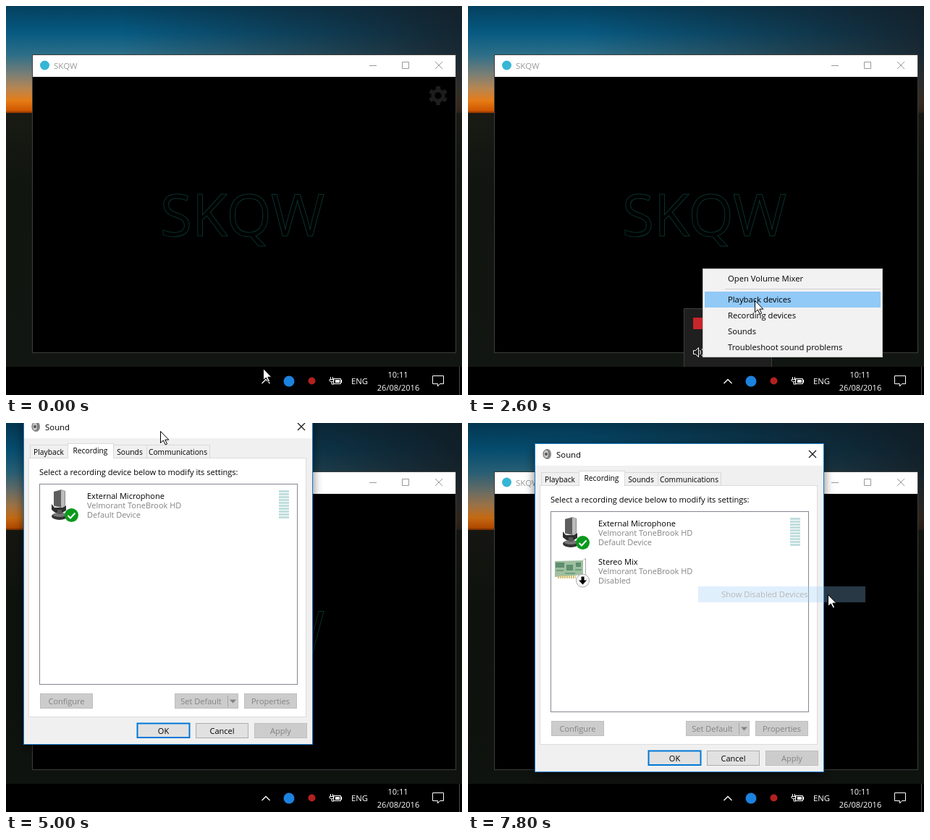
An HTML page for the animation above (8000 ms loop, 630x538 px).

```html
<!DOCTYPE html>
<html lang="en">
<head>
<meta charset="utf-8">
<title>Sound settings</title>
<style>
  html, body { margin: 0; width: 100%; height: 100%; overflow: hidden; background: #000; }
  svg { display: block; width: 100vw; height: 100vh; font-family: "Open Sans", sans-serif; font-size: 11px; }
  .mid { text-anchor: middle; }
  .line { fill: none; stroke: #fff; }
  .dim { fill: #838383; }
  .menu { font-size: 11.25px; }
  .tab { font-size: 10.25px; }
</style>
</head>
<body>
<svg viewBox="0 0 630 538">
  <defs>
    <linearGradient id="sky" x2="0" y2="1">
      <stop offset="0" stop-color="#04405f"/>
      <stop offset=".25" stop-color="#075a82"/>
      <stop offset=".46" stop-color="#2f6f88"/>
      <stop offset=".64" stop-color="#7d7f74"/>
      <stop offset=".77" stop-color="#b98650"/>
      <stop offset=".88" stop-color="#e67c16"/>
      <stop offset=".97" stop-color="#cf5600"/>
      <stop offset="1" stop-color="#6b2600"/>
    </linearGradient>
    <linearGradient id="dusk">
      <stop offset=".25" stop-color="#161c22" stop-opacity="0"/>
      <stop offset="1" stop-color="#161c22" stop-opacity=".85"/>
    </linearGradient>
    <linearGradient id="ground" x2="0" y2="1">
      <stop offset="0" stop-color="#191a14"/>
      <stop offset=".3" stop-color="#10150f"/>
      <stop offset="1" stop-color="#121612"/>
    </linearGradient>
    <filter id="shadow" x="-10%" y="-10%" width="120%" height="120%">
      <feDropShadow dx="0" dy="4" stdDeviation="7" flood-opacity=".55"/>
    </filter>
  </defs>

  <g id="desktop">
    <rect width="630" height="149" fill="url(#sky)"/>
    <rect width="630" height="149" fill="url(#dusk)"/>
    <rect y="148" width="630" height="351" fill="url(#ground)"/>
    <rect id="shade" width="630" height="499" opacity=".15"/>
  </g>

  <g id="player">
    <rect x="36.5" y="67.5" width="585" height="412" stroke="#3b3d3b"/>
    <rect x="37" y="68" width="584" height="30" fill="#fff"/>
    <circle cx="53.5" cy="82" r="6.5" fill="#35b6d4"/>
    <text x="66" y="87" font-size="11.5" fill="#999">SKQW</text>
    <path d="M502 82.5h10M547.5 77.5h9v9h-9zM593 77l10 10m0-10l-10 10" fill="none" stroke="#999"/>
    <text x="213" y="318" font-size="80" fill="none" stroke="#07332d">SKQW</text>
    <g id="gear" transform="translate(597 124)" fill="none" stroke="#1d1d1d">
      <circle r="7.2" stroke-width="5"/>
    </g>
  </g>

  <g id="taskbar">
    <rect y="499" width="630" height="39"/>
    <rect id="trayHover" x="347" y="499" width="24" height="39" fill="#1c1c1c"/>
    <path class="line" d="M353.5 522l5.500-5.500 5.500 5.500" stroke-width="1.300"/>
    <circle cx="391" cy="519" r="7.500" fill="#1c82e0"/>
    <circle cx="422.500" cy="518.500" r="5" fill="#b3211f"/>
    <path class="line" d="M452.500 515.500h10v7h-10zM463.500 517v4M448.500 513v3m3-3v3M447 516.500h6v2q-3 3-6 0zM450 520v3h3"/>
    <rect x="455" y="517" width="6" height="4" fill="#fff"/>
    <g fill="#fff">
      <text x="477" y="523" font-size="11.300">ENG</text>
      <text class="mid" x="541.500" y="514">10:11</text>
      <text class="mid" x="542" y="532">26/08/2016</text>
    </g>
    <path class="line" d="M589.500 511.500h15v11h-5l-3 3.500v-3.500h-7z"/>
    <path d="M626.500 499v39" stroke="#4a4a4a"/>
  </g>

  <g id="flyout">
    <path d="M298.500 499v-80.500h121v80.500" fill="#1f1f1f" stroke="#3d3d3d"/>
    <rect id="speakerHover" x="299" y="459" width="40" height="40" fill="#404040"/>
    <rect x="311" y="431" width="16" height="16" rx="1" fill="#c9252c"/>
    <circle cx="359" cy="439" r="8" fill="#1da1e6"/>
    <path d="M393 432h13v10h-13z" fill="#8b8b8b" stroke="#ccc"/>
    <path d="M392 444h5v3h-5zM401 444h5v3h-5z" fill="#b5b5b5"/>
    <path class="line" d="M311.500 476.500h3l4-4v13l-4-4h-3zM320.500 476q2 3 0 6M323 474q3.500 5 0 10M325.500 472.500q4 6.500 0 13"/>
    <circle cx="359" cy="479.500" r="6" fill="#fff"/>
    <path class="line" d="M394 486a12 12 0 0 1 12-12M397 486a9 9 0 0 1 9-9M400 486a6 6 0 0 1 6-6"/>
    <circle cx="404.500" cy="484.500" r="1.600" fill="#fff"/>
  </g>

  <g id="dialog">
    <rect x="92.500" y="28.500" width="399" height="454" fill="#f0f0f0" stroke="#1979ca" filter="url(#shadow)"/>
    <rect x="93" y="29" width="398" height="30" fill="#fff"/>
    <ellipse cx="110" cy="43" rx="5" ry="7" fill="#8b8b8b"/>
    <ellipse cx="108" cy="43" rx="4" ry="6" fill="#c6c6c6" stroke="#555"/>
    <circle cx="108" cy="43" r="2" fill="#555"/>
    <text x="122" y="48" font-size="11.400">Sound</text>
    <path d="M471 38l10 10m0-10l-10 10" stroke="#111" stroke-width="1.200"/>
    <rect x="99.500" y="86.500" width="383" height="358" fill="#fff" stroke="#dcdcdc"/>
    <g id="tabs"></g>
    <text x="114" y="110" font-size="11.100">Select a recording device below to modify its settings:</text>
    <rect x="114.500" y="122.500" width="356" height="277" fill="#fff" stroke="#828790"/>
    <g id="microphone">
      <ellipse cx="142" cy="167" rx="11" ry="5" fill="#333"/>
      <ellipse cx="142" cy="165" rx="9" ry="3" fill="#777"/>
      <path d="M131 150l4 5h11l5-3v7l-5 3h-10l-5-4z" fill="#2e2e2e"/>
      <path d="M139 158h6v6h-6z" fill="#555"/>
      <path d="M134 133l10-3 6 2v20l-6 3-10-2z" fill="#888"/>
      <path d="M134 133l10-2v23l-10-2z" fill="#5e5e5e"/>
      <path d="M144 131l5 1v20l-5 2z" fill="#bbb"/>
      <circle cx="158.500" cy="165.500" r="9.500" fill="#0b9a1d"/>
      <path class="line" d="M153.500 166l3.500 3.500 6.500-7" stroke-width="2"/>
    </g>
    <g id="meter" fill="#c1dede"></g>
    <g id="stereo">
      <path d="M120 191l39-1v20l-39 3z" fill="#9fbf9f"/>
      <path d="M121 193h12v7h-12zM136 196h9v8h-9zM149 193h7v6h-7z" fill="#5e8f70"/>
      <path d="M122 204h10M134 208h14M148 203h9" stroke="#6fa083" stroke-width="2"/>
      <path d="M124 213h25" stroke="#d5bf72" stroke-width="4" stroke-dasharray="2 1"/>
      <path d="M159.500 190l3-3v24" fill="none" stroke="#aaa"/>
      <circle cx="158.500" cy="218" r="9" fill="#f6f6f6" stroke="#aaa"/>
      <path d="M156.500 212.500h4v5h3.500l-5.500 6-5.500-6h3.500z"/>
    </g>
    <g id="buttons"></g>
    <path d="M374.500 415v16" stroke="#a5a5a5"/>
    <path d="M377 420.500h9l-4.500 5z" fill="#838383"/>
  </g>

  <g id="menus"></g>
  <path id="cursor" d="M.5.5v16l3.800-3.500 3 6 2.300-1.100-2.800-5.700h5z" fill="#fff" stroke="#000"/>
</svg>
<script>
const LOOP = 8000, STEP = 200;
const $ = id => document.getElementById(id);

function add(parent, tag, attrs, text = '') {
  const el = document.createElementNS('http://www.w3.org/2000/svg', tag);
  for (const key in attrs) el.setAttribute(key, attrs[key]);
  el.textContent = text;
  return parent.appendChild(el);
}
const box = (parent, x, y, width, height, fill, stroke = 'none') =>
  add(parent, 'rect', { x, y, width, height, fill, stroke });
const label = (parent, x, y, text, cls = '') => add(parent, 'text', { x, y, class: cls }, text);
const show = (id, on) => $(id).style.display = on ? '' : 'none';

for (let i = 0; i < 6; i++)
  add($('gear'), 'path', { d: 'M0-8v-5', 'stroke-width': 6, transform: `rotate(${i * 60})` });
for (let i = 0; i < 10; i++) box($('meter'), 445, 131 + i * 4, 14, 3, '#c1dede');

[['Playback', 101, 52], ['Sounds', 216, 46], ['Communications', 262, 87], ['Recording', 153, 63]]
  .forEach(([name, x, w]) => {
    const active = name === 'Recording', y = active ? 66.5 : 68.5;
    box($('tabs'), x + .5, y, w, 86.5 - y, active ? '#fff' : '#f0f0f0', '#d9d9d9');
    if (active) box($('tabs'), x + 1, 85, w - 1, 3, '#fff');
    label($('tabs'), x + w / 2, active ? 80 : 82, name, 'tab mid');
  });

function device(parent, y, name, status) {
  label(parent, 180, y, name);
  label(parent, 180, y + 13, 'Velmorant ToneBrook HD', 'dim');
  label(parent, 180, y + 26, status, 'dim');
}
device($('microphone'), 143, 'External Microphone', 'Default Device');
device($('stereo'), 196, 'Stereo Mix', 'Disabled');

function button(x, y, w, text, style, textX = x + w / 2) {
  const [fill, stroke] = { off: ['#ccc', '#bfbfbf'], on: ['#e1e1e1', '#adadad'], focus: ['#e1e1e1', '#0078d7'] }[style];
  const frame = box($('buttons'), x + .5, y + .5, w - 1, 20, fill, stroke);
  if (style === 'focus') {
    frame.setAttribute('stroke-width', 2);
    frame.setAttribute('height', 19.5);
  }
  label($('buttons'), textX, y + 15, text, style === 'off' ? 'mid dim' : 'mid');
}
button(115, 412, 73, 'Configure', 'off');
button(301, 412, 88, 'Set Default', 'off', 337.5);
button(397, 412, 73, 'Properties', 'off');
button(249, 453, 73, 'OK', 'focus');
button(330, 453, 73, 'Cancel', 'on');
button(411, 453, 73, 'Apply', 'off');

// rows: [text, top]; the chosen row lingers for one step after closing
function makeMenu(x, y, w, h, rows, open, close, chosen) {
  const root = add($('menus'), 'g', { class: 'menu' });
  const frame = box(root, x + .5, y + .5, w - 1, h - 1, '#f2f2f2', '#bdbdbd');
  const line = rows.length > 2 ? box(root, x + 31, y + 28, w - 34, 1, '#cfcfcf') : null;
  const items = rows.map(([text, top]) => {
    const g = add(root, 'g', {});
    const bar = box(g, x + 3, y + top, w - 6, 22, '#91c9f7');
    label(g, x + 35, y + top + 15, text);
    return { g, bar, top: y + top };
  });
  return (t, cx, cy) => {
    const fading = t === close;
    root.style.display = t >= open && t <= close ? '' : 'none';
    root.style.opacity = fading ? .28 : 1;
    for (const el of [frame, line]) if (el) el.style.display = fading ? 'none' : '';
    items.forEach(({ g, bar, top }, i) => {
      const hover = cx > x + 3 && cx < x + w - 3 && cy >= top && cy < top + 22;
      g.style.display = fading && i !== chosen ? 'none' : '';
      bar.style.display = (fading ? i === chosen : hover) ? '' : 'none';
    });
  };
}
const menus = [
  makeMenu(324, 363, 249, 123, [['Open Volume Mixer', 3], ['Playback devices', 32],
    ['Recording devices', 54], ['Sounds', 76], ['Troubleshoot sound problems', 98]], 2200, 3200, 2),
  makeMenu(315, 223, 237, 51, [['Show Disabled Devices', 3], ['Show Disconnected Devices', 25]], 6200, 7800, 0)
];

// [time, x, y]
const cursorPath = [[0, 355, 501], [400, 358, 513], [1200, 358, 513], [1600, 326, 491], [1800, 324, 487],
  [2200, 324, 487], [2600, 396, 407], [3000, 407, 429], [3200, 407, 429], [3600, 418, 420], [4800, 418, 420],
  [4999, 213, 11], [5000, 213, 11], [5200, 250, 33], [5400, 276, 48], [5600, 292, 115], [6000, 315, 223],
  [6200, 315, 223], [6400, 322, 230], [6800, 322, 230], [7400, 497, 237], [8000, 497, 237]];
const dialogPath = [[5000, -68, -38], [5200, -28, -16], [5400, 0, 0], [8000, 0, 0]];

function at(path, t) {
  const i = Math.max(1, path.findIndex(p => p[0] >= t));
  const a = path[i - 1], b = path[i], k = Math.max(0, (t - a[0]) / (b[0] - a[0]));
  return [1, 2].map(n => Math.round(a[n] + (b[n] - a[n]) * k));
}
const move = (id, pos) => $(id).setAttribute('transform', `translate(${pos})`);

function draw(t) {
  const pointer = at(cursorPath, t);
  move('cursor', pointer);
  move('dialog', at(dialogPath, t));
  $('gear').style.opacity = Math.max(0, 1 - t / 1200);
  show('shade', t >= 5000);
  show('trayHover', t >= 200 && t < 1400);
  show('flyout', t >= 1000 && t < 4000);
  show('speakerHover', t >= 1600 && t < 2200);
  show('dialog', t >= 5000);
  show('stereo', t >= 7800);
  menus.forEach(update => update(t, ...pointer));
}

const start = performance.now();
function tick() {
  const t = (performance.now() - start) % LOOP;
  draw(Math.floor(t / STEP) * STEP);
  requestAnimationFrame(tick);
}
tick();
</script>
</body>
</html>
```
